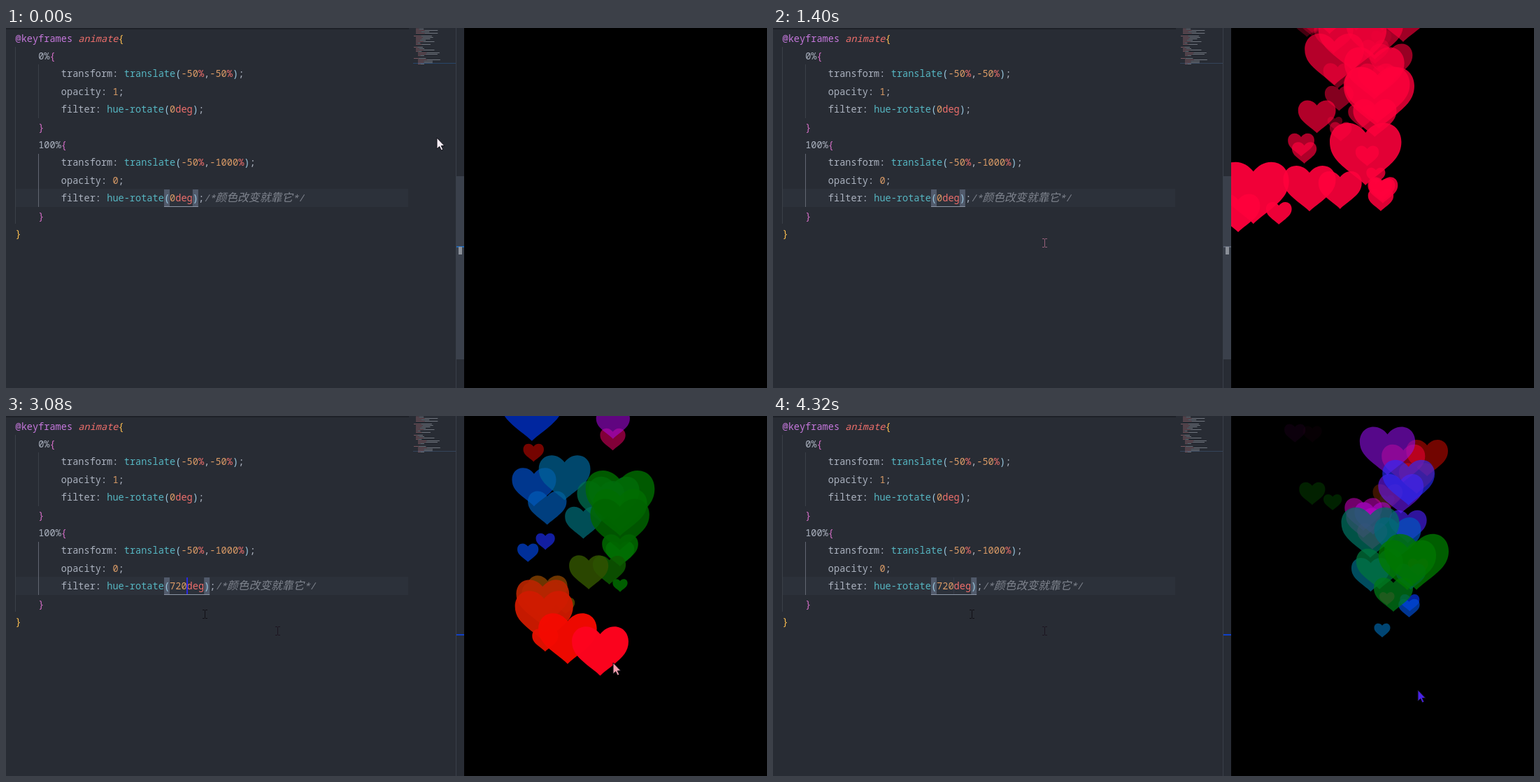
These frames come from a looping animation (1088 by 515 pixels, 4.39 s). An HTML page with a canvas:

```html
<!DOCTYPE html>
<html lang="zh">
<head>
<meta charset="utf-8">
<style>
  html, body { margin: 0; width: 100%; height: 100%; overflow: hidden; background: #000; }
  canvas { display: block; }
</style>
</head>
<body>
<canvas id="stage" width="1088" height="515"></canvas>
<script>
const ctx = document.getElementById('stage').getContext('2d');
const LOOP = 4390, LIFE = 2050, RISE = 0.00455, BIRTH_GAP = 30;
const PANE = 655, RELOAD = 1890, TYPING = 1740;
const CHAR = 8.17, LINE = 25.4, CJK_SIZE = 15.8;
const MONO = '"Noto Sans Mono", "DejaVu Sans Mono", monospace';
const CJK = '"Noto Sans CJK SC", "Noto Sans CJK", sans-serif';
const INK = {
  plain: '#abb2bf', purple: '#c678dd', red: '#ef6f6c', cyan: '#56b6c2', orange: '#d89a66',
  gold: '#ffc050', pink: '#d66fc8', sky: '#9ac8e0', note: '#7f848e'
};

// Turning points of the pointer: [clock, x, y]. Hearts are born along this route.
const route = [
  [-560, 616, 152], [-500, 868, 240], [-370, 870, 250], [-180, 756, 260], [0, 772, 268],
  [150, 875, 266], [330, 800, 278], [430, 810, 285], [620, 902, 285],
  [720, 754, 285], [900, 860, 262], [1120, 872, 290], [1330, 662, 289], [1400, 388, 302],
  [1560, 284, 278], [1900, 284, 278], [1920, 658, 197], [2100, 868, 196], [2200, 870, 200],
  [2390, 746, 290], [2610, 878, 286], [2750, 878, 280], [2900, 766, 308], [2990, 770, 335],
  [3080, 868, 348], [3220, 937, 355], [3400, 842, 362], [3540, 908, 350], [3640, 912, 366],
  [3760, 852, 372], [3910, 922, 387]
];
const routeStart = route[0][0], routeEnd = route[route.length - 1][0];

const heart = new Path2D('M0-.3C.06-.38.15-.435.25-.435C.4-.435.5-.32.5-.17' +
  'C.5 .01.39 .11.26 .22C.15 .31.05 .38 0 .435C-.05 .38-.15 .31-.26 .22' +
  'C-.39 .11-.5 .01-.5-.17C-.5-.32-.4-.435-.25-.435C-.15-.435-.06-.38 0-.3Z');
const arrow = new Path2D('M0 0V16L3.7 12.6L6.3 18L8.8 16.8L6.3 11.6H11Z');

function random(seed) {
  const v = Math.sin(seed * 12.9898 + 4.1) * 43758.5453;
  return v - Math.floor(v);
}

function rect(x, y, w, h, color) {
  ctx.fillStyle = color;
  ctx.fillRect(x, y, w, h);
}

function clockAt(t) {
  return t < 620 ? 620 - (620 - t) * 2.1 : t;
}

function pointerAt(clock) {
  const time = Math.max(routeStart, Math.min(routeEnd, clock));
  const k = route.findIndex((p, i) => i > 0 && p[0] >= time);
  const [t0, x0, y0] = route[k - 1], [t1, x1, y1] = route[k];
  const u = (time - t0) / (t1 - t0), eased = u * u * (3 - 2 * u);
  return [x0 + (x1 - x0) * eased, y0 + (y1 - y0) * eased];
}

function makeHearts() {
  const list = [];
  for (let born = routeStart + 15, n = 0; born < routeEnd; born += BIRTH_GAP, n++) {
    const [x, y] = pointerAt(born);
    if (x > PANE) list.push({ born, x, y, size: 20 + 84 * random(n) });
  }
  return list;
}
const hearts = makeHearts();

// CSS hue-rotate applied to the heart's red.
function hueRotated(deg) {
  const c = Math.cos(deg * Math.PI / 180), s = Math.sin(deg * Math.PI / 180);
  const r = 255, b = 60;
  const mix = [
    r * (.213 + .787 * c - .213 * s) + b * (.072 - .072 * c + .928 * s),
    r * (.213 - .213 * c + .143 * s) + b * (.072 - .072 * c - .283 * s),
    r * (.213 - .213 * c - .787 * s) + b * (.072 + .928 * c + .072 * s)
  ];
  return `rgb(${mix.map(v => Math.round(Math.max(0, Math.min(255, v)))).join()})`;
}

function drawHearts(clock) {
  const reloaded = clock >= RELOAD;
  ctx.save();
  ctx.beginPath();
  ctx.rect(PANE, 0, 1088 - PANE, 515);
  ctx.clip();
  for (const { born, x, y, size } of hearts) {
    const age = clock - born;
    if (age < 0 || age > LIFE || reloaded !== born >= RELOAD) continue;
    ctx.save();
    ctx.translate(x, y - RISE * size * age);
    ctx.scale(size, size);
    ctx.globalAlpha = 1 - age / LIFE;
    ctx.fillStyle = hueRotated(reloaded ? 720 * age / LIFE : 0);
    ctx.fill(heart);
    ctx.restore();
  }
  ctx.restore();
}

// Tokens are pairs of ink name and text.
function codeLine(row, indent, ...tokens) {
  let x = 13.5 + indent * 4 * CHAR;
  const y = 19.5 + row * LINE;
  for (let i = 0; i < tokens.length; i += 2) {
    const text = tokens[i + 1], wide = text.charCodeAt(0) > 255;
    const slant = tokens[i] === 'note' || text === 'animate' ? 'italic ' : '';
    ctx.font = slant + (wide ? `${CJK_SIZE}px ${CJK}` : `13.6px ${MONO}`);
    ctx.fillStyle = INK[tokens[i]];
    ctx.fillText(text, x, y);
    x += text.length * (wide ? CJK_SIZE : CHAR);
  }
}

function ruleLines(row, selector, shift, opacity, angle, ...note) {
  codeLine(row, 1, 'plain', selector, 'pink', '{');
  codeLine(row + 1, 2, 'plain', 'transform: ', 'cyan', 'translate', 'sky', '(', 'orange', '-50', 'red', '%',
    'plain', ',', 'orange', shift, 'red', '%', 'sky', ')', 'plain', ';');
  codeLine(row + 2, 2, 'plain', 'opacity: ', 'orange', opacity, 'plain', ';');
  codeLine(row + 3, 2, 'plain', 'filter: ', 'cyan', 'hue-rotate', 'sky', '(', 'orange', angle, 'red', 'deg',
    'sky', ')', 'plain', ';', ...note);
  codeLine(row + 4, 1, 'pink', '}');
}

function drawMinimap(t) {
  for (let row = 0; row < 26; row++) {
    if (row % 8 === 4) continue;
    const x = row % 8 === 5 ? 583 : row < 17 ? 586 : 589;
    const length = 6 + 26 * random(row + 60);
    rect(x, 1 + row * 2, length * .4, 1, '#b0727a99');
    rect(x + length * .4, 1 + row * 2, length * .6, 1, '#a0a6b099');
  }
  rect(582, 50, 61, 1, t < 70 ? '#28466a' : '#35445a');
}

function drawEditor(t, inEditor) {
  const typed = Math.min(3, 1 + Math.floor((t - TYPING) / 70));
  const angle = t < TYPING ? '0' : '720'.slice(0, typed);
  const close = 226 + (angle.length + 4) * CHAR;

  rect(0, 0, PANE, 515, '#282c34');
  rect(0, 0, 576, 2, '#1e2128');
  rect(13, 230, 562, 26, '#2c313a');
  rect(13, 27, 1, 253, '#3b4048');
  rect(46, 52, 1, 77, '#3b4048');
  rect(46, 180, 1, 76, '#626772');

  rect(226, 231, 8, 24, '#515a6b');
  rect(close, 231, 8, 24, '#515a6b');
  rect(226, 255, close - 218, 1, '#8b95a5');

  codeLine(0, 0, 'purple', '@keyframes ', 'red', 'animate', 'gold', '{');
  ruleLines(1, '0%', '-50', '1', '0');
  ruleLines(6, '100%', '-1000', '0', angle, 'note', '/*', 'note', '颜色改变就靠它', 'note', '*/');
  codeLine(11, 0, 'gold', '}');

  if (t > TYPING) {
    const lit = (t + 400) % 1000 < 500;
    rect(Math.round(233.5 + angle.length * CHAR), 231, lit ? 2 : 1, 24, lit ? '#2a2ae0' : '#343a46');
  }

  drawMinimap(t);
  rect(643, 0, 1, 515, '#3a3f49');
  if (inEditor) rect(644, 212, 11, 262, '#3a404b');
  else if (t > RELOAD && t < 2500) rect(644, 212, 11, 262, '#2e333c');
  rect(644, 312, 11, 2, t < 70 ? '#2568b0' : t < 2500 ? '#596170' : '#1040c8');
  if (t < RELOAD) rect(647, 313, 5, 11, '#8a8f98');
}

function beam(x, y, color) {
  for (const side of [-3, 1]) {
    rect(x + side, y - 6, 3, 1, color);
    rect(x + side, y + 6, 3, 1, color);
  }
  rect(x, y - 5, 1, 11, color);
}

function drawPointer(t, x, y) {
  if (t > RELOAD) {
    beam(284, 283, '#121016');
    beam(388, 307, '#1c1420');
  }
  if (x < 570) {
    beam(Math.round(x), Math.round(y), '#96607a');
    return;
  }
  ctx.save();
  ctx.translate(x, y);
  ctx.fillStyle = t < RELOAD ? '#f4ecf4' : t < 2750 ? '#e8f4dc' : t < 3500 ? '#f4a0b0' : '#4a22e8';
  ctx.strokeStyle = '#101018';
  ctx.fill(arrow);
  ctx.stroke(arrow);
  ctx.restore();
}

function draw(now) {
  const t = now % LOOP, clock = clockAt(t);
  const [x, y] = pointerAt(clock);
  rect(0, 0, 1088, 515, '#000');
  drawEditor(t, x < PANE);
  if (t >= 70) drawHearts(clock);
  drawPointer(t, x, y + 5);
}

let start;
function tick(now) {
  start ??= now;
  draw(now - start);
  requestAnimationFrame(tick);
}
draw(0);
requestAnimationFrame(tick);
</script>
</body>
</html>
```
